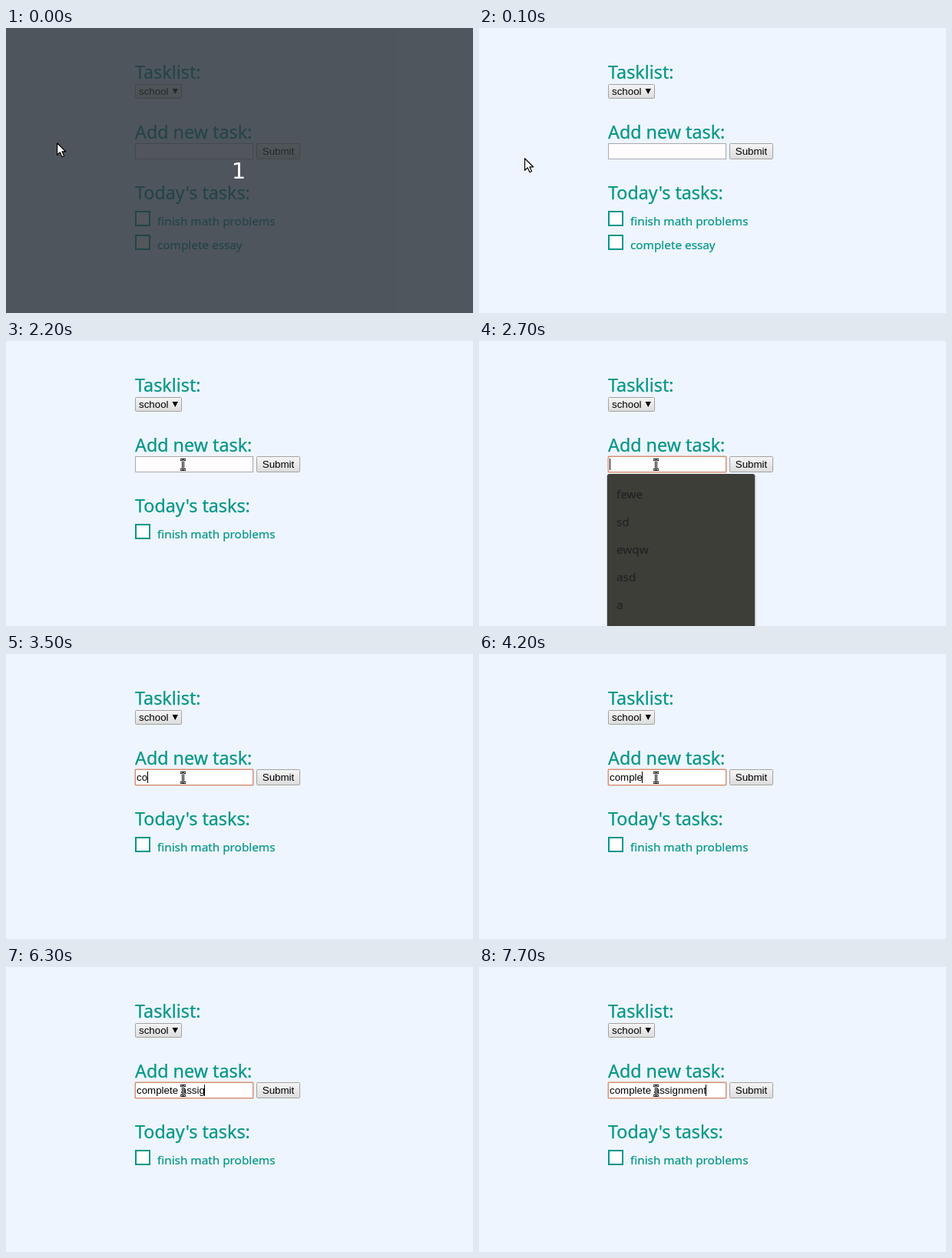
Animation of 608x371 px, one loop 8000 ms. Source, as an HTML page:

```html
<!DOCTYPE html>
<html lang="en">
<head>
<meta charset="utf-8">
<title>Task list</title>
<style>
  html, body { margin: 0; width: 100%; height: 100%; overflow: hidden; background: #eef5ff; }
  svg { display: block; width: 608px; height: 371px; }
  text { white-space: pre; }
  .head { font: 23.3px "Noto Sans", "Open Sans", sans-serif; fill: #009688; stroke: #009688; stroke-width: .25; }
  .item { font: 15.3px "Noto Sans", "Open Sans", sans-serif; fill: #009688; stroke: #009688; stroke-width: .2; }
  .ctl { font: 13.333px "Liberation Sans", Arial, sans-serif; fill: #000; }
  .box { fill: #fff; stroke: #009688; stroke-width: 2; }
  .btn { fill: url(#face); stroke: #a2a2a2; }
  #popup .item { fill: #232325; stroke: #232325; }
  #count { font: 29px "DejaVu Sans", sans-serif; fill: #fff; text-anchor: middle; }
</style>
</head>
<body>
<svg viewBox="0 0 608 371">
  <defs>
    <linearGradient id="face" x2="0" y2="1">
      <stop offset="0" stop-color="#f6f6f6"/>
      <stop offset="1" stop-color="#dcdcdc"/>
    </linearGradient>
  </defs>
  <rect width="608" height="371" fill="#eef5ff"/>

  <text class="head" x="168" y="66">Tasklist:</text>
  <rect class="btn" x="168.5" y="73.5" width="60" height="18" rx="1"/>
  <text class="ctl" x="173" y="87">school</text>
  <path d="M216.500 79h7.500l-3.750 7z"/>

  <text class="head" x="168" y="144">Add new task:</text>
  <rect x="168.5" y="150.5" width="153" height="20" fill="#fffdfe" stroke="#aaa9ae"/>
  <g id="focus">
    <rect x="167.5" y="149.5" width="155" height="22" rx="2" fill="none" stroke="#ecc8b8"/>
    <rect x="168.5" y="150.5" width="153" height="20" fill="#fff" stroke="#d08e74"/>
  </g>
  <text id="typed" class="ctl" x="170" y="165"></text>
  <rect id="caret" y="153" width="1" height="15"/>
  <rect class="btn" x="326.5" y="150.5" width="56" height="20" rx="1"/>
  <text class="ctl" x="354.5" y="165" text-anchor="middle">Submit</text>

  <text class="head" x="168" y="223">Today's tasks:</text>
  <rect class="box" x="169" y="239" width="18" height="18"/>
  <text class="item" x="197" y="257">finish math problems</text>
  <g id="essay">
    <rect class="box" x="169" y="270" width="18" height="18"/>
    <text class="item" x="197" y="288">complete essay</text>
  </g>

  <g id="popup">
    <rect x="166" y="173" width="194.5" height="205" rx="4" fill="#8d929a" opacity=".45"/>
    <rect x="167" y="173" width="192" height="205" rx="3" fill="#3e3e38"/>
  </g>

  <g id="shade">
    <rect width="608" height="371" fill="#2c3339" fill-opacity=".82"/>
    <text id="count" x="303" y="196">1</text>
  </g>

  <!-- pointers, hotspot at 0,0 -->
  <g id="arrow">
    <path d="M.6 .8V16.3L4.300 12.800L7 18.700L9.600 17.500L7 11.800H11.700Z"
          fill="#fff" stroke="#000" stroke-width="1.2" stroke-linejoin="round"/>
  </g>
  <g id="hand">
    <path d="M-1.500 8.500V1.300C-1.500 0 1 0 1 1.300V6C1.500 5.200 3.500 5.200 4 6.300C4.700 5.500 6.400 5.700 6.700 6.800C7.600 6.300 9.200 6.900 9.200 8.200V11.500C9.200 13.300 8 13.800 7.800 15.500H-2C-2.500 13.300 -5 11.500 -5.500 9.200C-5.700 7.500 -3.600 7 -2.700 8.200Z"
          fill="#fff" stroke="#000" stroke-width="1.2" stroke-linejoin="round"/>
    <path d="M1 10.500v1M3.500 10.500v1M6 10.500v1" stroke="#000"/>
  </g>
  <g id="beam" fill="none">
    <path d="M-3.500 -6.500H-1L0 -5.500L1 -6.500H3.500M0 -5.500V5.500M-3.500 6.500H-1L0 5.500L1 6.500H3.500"
          stroke="#000" stroke-width="3"/>
    <path d="M-3 -6.500H-1L0 -5.500L1 -6.500H3M0 -5.500V5.500M-3 6.500H-1L0 5.500L1 6.500H3"
          stroke="#fff" stroke-width="1"/>
  </g>
</svg>
<script>
const LOOP = 8000;
const PHRASE = "complete assignment";
const $ = id => document.getElementById(id);

// time, pointer, x, y
const moves = [
  [0, "arrow", 66, 149],
  [100, "arrow", 59, 169],
  [200, "arrow", 60, 195],
  [300, "arrow", 73, 225],
  [400, "arrow", 95, 252],
  [600, "arrow", 112, 274],
  [700, "arrow", 138, 288],
  [800, "arrow", 162, 288],
  [900, "hand", 182, 283],
  [1400, "hand", 183, 281],
  [1600, "arrow", 186, 276],
  [1700, "arrow", 193, 258],
  [1800, "arrow", 204, 235],
  [1900, "arrow", 216, 208],
  [2000, "arrow", 225, 185],
  [2100, "beam", 230, 167],
  [2200, "beam", 230.5, 161]
];

// one keystroke per character of PHRASE
const keys = [3300, 3500, 3700, 4000, 4100, 4200, 4400, 4600, 4700, 4900,
  5100, 5300, 6100, 6300, 6800, 7100, 7200, 7500, 7700];

["fewe", "sd", "ewqw", "asd", "a"].forEach((word, i) => {
  const row = document.createElementNS("http://www.w3.org/2000/svg", "text");
  row.setAttribute("class", "item");
  row.setAttribute("x", 179);
  row.setAttribute("y", 205 + 36 * i);
  row.textContent = word;
  $("popup").append(row);
});

const show = (id, on) => $(id).style.display = on ? "" : "none";
const between = (t, a, b) => t >= a && t < b;

function draw(t) {
  show("shade", t < 100);
  show("essay", t < 1500);
  show("focus", t >= 2700);
  show("popup", between(t, 2700, 3400));

  const text = PHRASE.slice(0, keys.filter(k => k <= t).length);
  $("typed").textContent = text;
  const width = text ? $("typed").getComputedTextLength() : 0;
  $("caret").setAttribute("x", Math.floor(170 + width));
  show("caret", t >= 2700 && !between(t, 5900, 6100));

  const [, kind, x, y] = moves.filter(m => m[0] <= t).pop();
  for (const id of ["arrow", "hand", "beam"]) show(id, id === kind);
  $(kind).setAttribute("transform", `translate(${x} ${y})`);
}

const start = performance.now();
function tick() {
  draw((performance.now() - start) % LOOP);
  requestAnimationFrame(tick);
}
tick();
</script>
</body>
</html>
```
